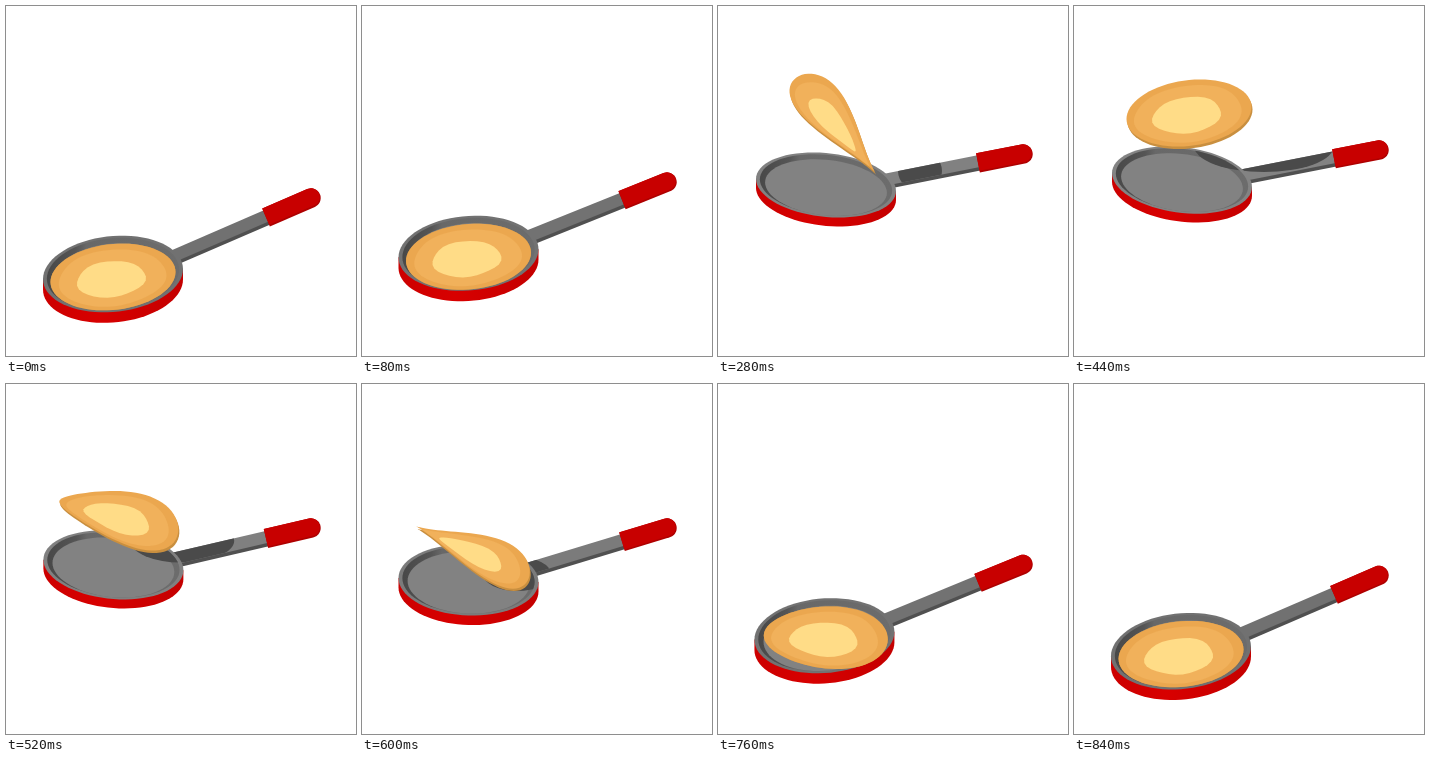
Animation, 350 px wide and 350 px high, one loop 0.86 s. Source, as an HTML page:

```html
<!DOCTYPE html>
<html lang="en">
<head>
<meta charset="utf-8">
<title>Pancake flip</title>
<style>
  html, body { margin: 0; width: 100%; height: 100%; overflow: hidden; background: #fff; }
  svg { display: block; width: 100vw; height: 100vh; }
</style>
</head>
<body>
<svg viewBox="0 0 350 350">
  <defs>
    <linearGradient id="red">
      <stop offset="0" stop-color="#cc0000"/>
      <stop offset=".4" stop-color="#d80000"/>
      <stop offset="1" stop-color="#c40000"/>
    </linearGradient>
    <linearGradient id="wall">
      <stop offset="0" stop-color="#484848"/>
      <stop offset=".22" stop-color="#555"/>
      <stop offset=".3" stop-color="#686868"/>
      <stop offset="1" stop-color="#6c6c6c"/>
    </linearGradient>
    <clipPath id="onPlate"><path id="plateClip"/></clipPath>
    <clipPath id="onPan"><path id="panClip"/></clipPath>
  </defs>
  <path id="plateSide" fill="#505050"/>
  <path id="plate"/>
  <g clip-path="url(#onPlate)"><ellipse id="shadeA" fill="#4a4a4a"/></g>
  <path id="gripSide" fill="#ae0000"/>
  <path id="grip" fill="#c80000"/>
  <path id="body" fill="url(#red)"/>
  <path id="rim"/>
  <path id="wallRing" fill="url(#wall)"/>
  <path id="floor"/>
  <g clip-path="url(#onPan)"><ellipse id="shadeB" fill="#4a4a4a"/></g>
  <path id="cakeSide" fill="#c98f3f"/>
  <path id="cake" fill="#eba74f"/>
  <path id="cakeMid" fill="#f1b15b"/>
  <path id="cakeTop" fill="#ffdc87"/>
</svg>
<script>
const LOOP = 860, STEP = 20;

// time, centre x, centre y, half depth, tilt, handle end y, handle slope
const PAN = [
  [0, 107, 268, 38, -5, 192, .433],
  [160, 106, 214, 36, -2, 156, .34],
  [280, 108, 179, 32, 6, 148, .197],
  [440, 108, 174, 33, 7, 144, .195],
  [600, 106.5, 196, 35.5, 2, 144, .304],
  [680, 106, 228, 36.5, -2, 164, .375],
  [860, 107, 268, 38, -5, 192, .433]
];

// time, centre x, height over pan, long axis x y, cross axis x y, taper
const CAKE = [
  [0, 107, 3, 62.5, -5, 0, 33, 0],
  [160, 106, 4, 62.5, -2, 0, 32, 0],
  [220, 110, -13, 57, 17, -5, 25, -.5],
  [280, 119, -61, 38, 48, -16, 8, -.95],
  [340, 119, -85, -3, 44, -9, 11, -.5],
  [380, 118, -82, -42, 32, -3, 20, -.2],
  [440, 115, -67, -62.5, 6, 0, 33, 0],
  [600, 111, -29, -56.5, -24.5, -3, 17, -.95],
  [680, 109, -1, -61, -12, -1, 27.4, -.36],
  [860, 107, 3, -62.5, 5, 0, 33, 0]
];

// time, centre x, height over pan, radii
const SHADE = [
  [0, 107, 2, 40, 20],
  [160, 106, 2, 40, 20],
  [220, 135, 0, 38, 17],
  [280, 202, -14, 22, 20],
  [440, 190, -34, 70, 26],
  [600, 155, -6, 34, 17],
  [680, 118, 15, 42, 16],
  [860, 107, 2, 40, 20]
];

const $ = id => document.getElementById(id);
const set = (id, d) => $(id).setAttribute('d', d);
const path = pts => 'M' + pts.map(p => p[0].toFixed(2) + ' ' + p[1].toFixed(2)).join('L') + 'Z';
const shift = (pts, dx, dy) => pts.map(([x, y]) => [x + dx, y + dy]);
const grey = v => `rgb(${v},${v},${v})`;

// Smooth keyframes that never overshoot
function sample(keys, t) {
  let i = 0;
  while (i < keys.length - 2 && t >= keys[i + 1][0]) i++;
  const h = keys[i + 1][0] - keys[i][0], x = (t - keys[i][0]) / h;
  const slope = (j, c) => (keys[j + 1][c] - keys[j][c]) / (keys[j + 1][0] - keys[j][0]);
  const tangent = (j, c) => {
    if (j === 0 || j === keys.length - 1) return 0;
    const a = slope(j - 1, c), b = slope(j, c);
    return a * b > 0 ? 2 * a * b / (a + b) : 0;
  };
  return keys[i].slice(1).map((p, n) => {
    const c = n + 1, q = keys[i + 1][c];
    const e = x * x * (3 - 2 * x);
    return p + (q - p) * e + h * x * (1 - x) * ((1 - x) * tangent(i, c) - x * tangent(i + 1, c));
  });
}

// Points of a closed curve from angle a to b
function arc(fn, a = 0, b = 2 * Math.PI, n = 72) {
  return Array.from({ length: n + 1 }, (_, i) => fn(a + (b - a) * i / n));
}

function drawHandle(endY, m, tone) {
  const at = x => [x, endY + (305 - x) * m];
  const len = Math.hypot(1, m), nx = m / len, ny = 1 / len;
  const off = ([x, y], d) => [x + nx * d, y + ny * d];
  const bar = (a, b, w) => [off(at(a), -w), off(at(b), -w), off(at(b), w), off(at(a), w)];
  const plate = bar(160, 262, 6);
  set('plateSide', path(shift(plate, .5, 2)));
  set('plate', path(shift(plate, 0, -1.5)));
  set('plateClip', path(shift(plate, 0, -1.5)));
  $('plate').setAttribute('fill', tone);

  const turn = Math.atan2(ny, nx), [ex, ey] = at(305);
  const grip = r => [off(at(260), r), off(at(260), -r),
    ...arc(a => [ex + r * Math.cos(a), ey + r * Math.sin(a)], turn - Math.PI, turn, 24)];
  set('gripSide', path(grip(9.7)));
  set('grip', path(shift(grip(8.9), -.2, -.8)));
}

function drawPan(cx, cy, b, s, tone) {
  const ring = (k, dy = 0) => a => [
    cx + 70 * k * Math.cos(a),
    cy + dy + k * (s * Math.cos(a) + b * Math.sin(a))
  ];
  const depth = 9.8 - s * .15;
  set('body', path([ring(1)(Math.PI), ...arc(ring(1, depth), Math.PI, 0, 40), ring(1)(0)]));
  set('rim', path(arc(ring(1))));
  set('wallRing', path(arc(ring(.945))));
  set('floor', path(arc(ring(.87, 2.6))));
  set('panClip', path(arc(ring(.945))));
  $('rim').setAttribute('fill', tone);
  $('floor').setAttribute('fill', grey(130));
}

function drawCake(cx, cy, ax, ay, bx, by, taper, lift) {
  const ring = (r, dv, wob) => a => {
    const k = r * (1 + wob * Math.sin(3 * a + 1) + wob * Math.sin(5 * a));
    const u = k * Math.cos(a), v = (k * Math.sin(a) + dv) * (1 + taper * u);
    return [cx + u * ax + v * bx, cy + u * ay + v * by];
  };
  const edge = arc(ring(1, 0, 0));
  set('cakeSide', path(shift(edge, lift, 2.5 * lift)));
  set('cake', path(edge));
  set('cakeMid', path(shift(arc(ring(.86, .03, .01)), -.8, 0)));
  set('cakeTop', path(shift(arc(ring(.55, .07, .018), 0, 2 * Math.PI, 30), -2, 0)));
}

function draw(t) {
  const [cx, cy, b, s, endY, m] = sample(PAN, t);
  const [px, rise, ax, ay, bx, by, taper] = sample(CAKE, t);
  const [sx, sy, rx, ry] = sample(SHADE, t);
  const tone = grey(Math.round(120 + 1.5 * s));

  drawHandle(endY, m, tone);
  drawPan(cx, cy, b, s, tone);
  for (const id of ['shadeA', 'shadeB']) {
    const e = $(id);
    e.setAttribute('cx', sx);
    e.setAttribute('cy', cy + sy);
    e.setAttribute('rx', rx);
    e.setAttribute('ry', ry);
  }
  const lift = Math.max(0, Math.min(1, -rise / 30));
  drawCake(px, cy + rise, ax, ay, bx, by, taper, lift);
}

const start = performance.now();
function frame() {
  const t = (performance.now() - start) % LOOP;
  draw(Math.floor(t / STEP) * STEP);
  requestAnimationFrame(frame);
}
frame();
</script>
</body>
</html>
```
